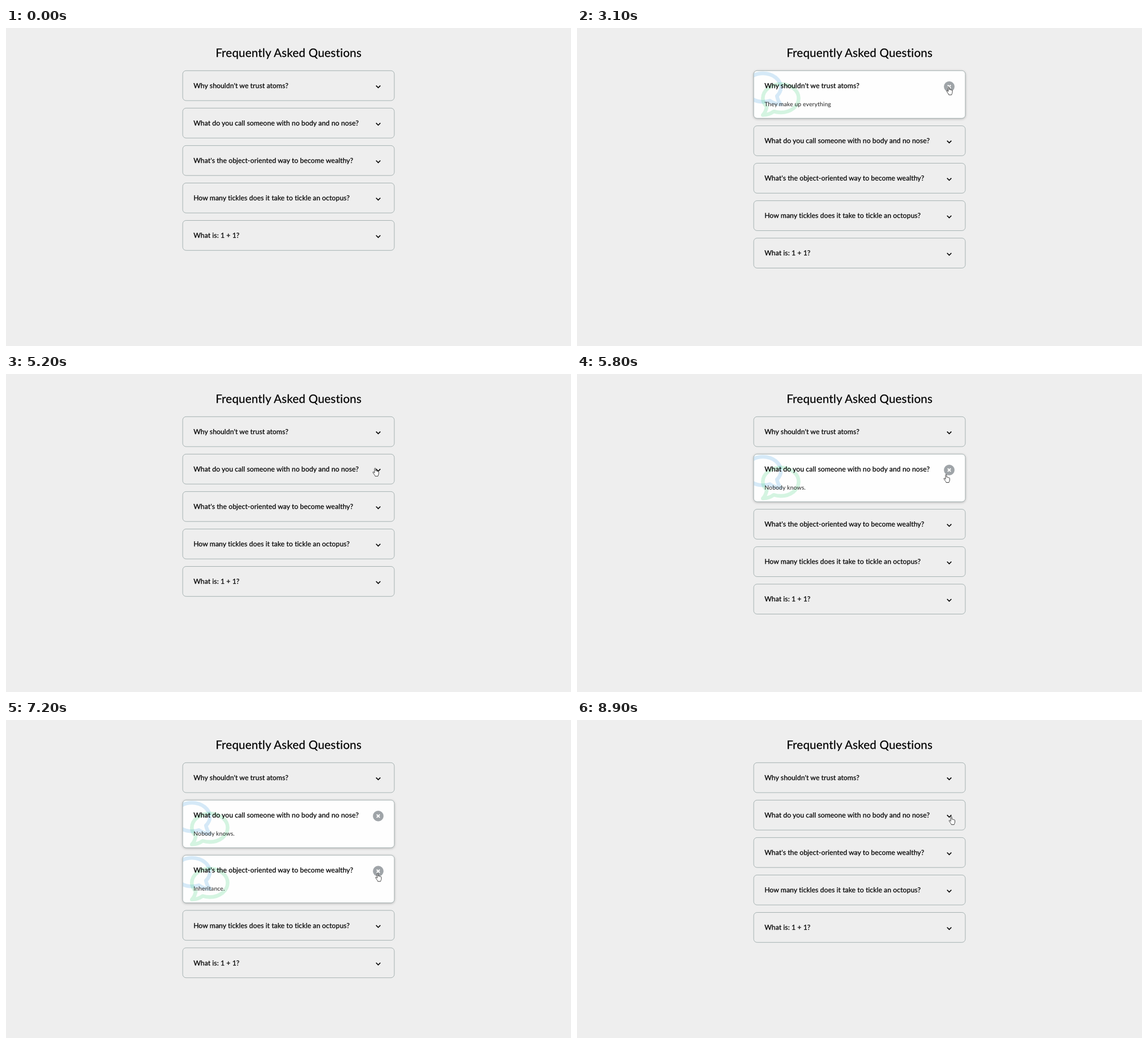
Animation of 998x561 px, one loop 9000 ms. Source, as an HTML page:

```html
<!DOCTYPE html>
<html lang="en">
<head>
<meta charset="utf-8">
<title>Frequently Asked Questions</title>
<style>
  html, body { margin: 0; width: 100%; height: 100%; overflow: hidden; background: #eee; }
  #stage { display: block; width: 998px; height: 561px; }
  text { font-family: Lato, "Open Sans", sans-serif; text-rendering: geometricPrecision; }
  .heading, .question { stroke: #000; stroke-width: .25px; }
  .heading { font-size: 20.5px; letter-spacing: .22px; }
  .question { font-size: 12.2px; letter-spacing: .07px; }
  .answer { font-size: 10.4px; letter-spacing: .14px; fill: #222; }
  .box { stroke: #94a3a3; stroke-width: .8; }
  .bubble { fill: none; stroke-width: 48; stroke-linejoin: round; opacity: .2; }
  .chevron, .cross { fill: none; stroke: #000; stroke-width: 1.6; }
  .cross { stroke: #fff; stroke-width: 2; }
  .cursor { fill: #fff; stroke: #222; stroke-width: .85; stroke-linejoin: round; }
</style>
</head>
<body>
<svg id="stage" viewBox="0 0 998 561">
  <defs>
    <clipPath id="inside"><rect x=".4" y=".6" width="373.2" height="83.4" rx="6"/></clipPath>
    <path id="bubble" d="M75 350C43 318 24 281 24 240C24 138 128 56 256 56S488 138 488 240 384 424 256 424C223 424 193 419 166 410C128 438 80 456 24 456C50 428 66 398 75 350Z"/>
  </defs>
  <text class="heading" x="499.1" y="51.2" text-anchor="middle">Frequently Asked Questions</text>
  <g id="cards"></g>
  <path id="hand" class="cursor" d="M-1 1.1C-1-.4 1-.4 1 1.1V4.9C1.5 4.3 2.7 4.5 2.8 5.4 3.4 4.8 4.5 5.1 4.6 6 5.3 5.5 6.3 5.9 6.3 6.9V9.8C6.3 11.6 5.3 12.3 4.9 14.3H.1C-.2 12.8-1.4 11.7-2.3 10.2L-3.8 7.9C-4.4 6.8-3.1 6.1-2.3 7L-1 8.4Z"/>
  <path id="arrow" class="cursor" d="M.5.5V13.5L3.5 10.8 5.5 15.5 7.5 14.6 5.5 10.2H9.5Z"/>
</svg>
<script>
const LOOP = 9000, STEP = 100, FADE = 300;
const LEFT = 312, TOP = 75, PITCH = 66.05, CLOSED = 52.8, GROWTH = 31.2;
const TOGGLE = { x: 345.5, y: 28.4, r: 9.4 };

const items = [
  { question: "Why shouldn't we trust atoms?", answer: "They make up everything", open: 1950, close: 3850 },
  { question: "What do you call someone with no body and no nose?", answer: "Nobody knows.", open: 5350, close: 8450 },
  { question: "What's the object-oriented way to become wealthy?", answer: "Inheritance.", open: 6750, close: 7450 },
  { question: "How many tickles does it take to tickle an octopus?" },
  { question: "What is: 1 + 1?" }
];

// Pointer path: time, x, y
const path = [
  [300, 219, 155], [500, 300, 100], [700, 420, 69], [1000, 590, 82], [1200, 648, 102], [1600, 656.7, 103.7],
  [4200, 656.7, 103.7], [4800, 654, 146], [5200, 652, 166],
  [5600, 652, 166], [5800, 652, 177.2], [6200, 656.7, 274.5], [6300, 656.7, 274.5], [6500, 656.7, 270.5],
  [7600, 656.7, 270.5], [8000, 661.2, 170.3], [LOOP, 661.2, 170.3]
];

const $ = id => document.getElementById(id);
const clamp = v => Math.min(1, Math.max(0, v));
const ease = v => 1 - (1 - clamp(v)) ** 2;

$("cards").innerHTML = items.map(({ question, answer = "" }) => `
  <g>
    <rect class="box" x=".1" y=".3" width="373.8" rx="6"/>
    <g class="opened">
      <g clip-path="url(#inside)">
        <use href="#bubble" class="bubble" stroke="#3498db" transform="translate(51.4 -2.6) scale(-.1363 .1363)"/>
        <use href="#bubble" class="bubble" stroke="#2ecc71" transform="translate(13 16.3) scale(.1363)"/>
      </g>
      <text class="answer" x="19.2" y="63">${answer}</text>
      <circle cx="${TOGGLE.x}" cy="${TOGGLE.y}" r="${TOGGLE.r}" fill="#9fa4a8"/>
      <path class="cross" d="M342.8 25.7l5.4 5.4m0-5.4l-5.4 5.4"/>
    </g>
    <text class="question" x="19.2" y="31">${question}</text>
    <path class="chevron" d="M341.7 26.6l3.8 3.8 3.8-3.8"/>
  </g>`).join("");

const cards = [...$("cards").children].map(group => ({
  group,
  box: group.querySelector(".box"),
  opened: group.querySelector(".opened"),
  chevron: group.querySelector(".chevron")
}));

const show = (node, on) => node.style.display = on ? "" : "none";

function pointerAt(t) {
  const i = path.findIndex(([time]) => time > t);
  if (i < 1) return null;
  const [t0, x0, y0] = path[i - 1], [t1, x1, y1] = path[i];
  const p = (t - t0) / (t1 - t0);
  return { x: x0 + (x1 - x0) * p, y: y0 + (y1 - y0) * p };
}

function render(t) {
  const pointer = pointerAt(t);
  let shift = 0, overToggle = false;

  cards.forEach(({ group, box, opened, chevron }, i) => {
    const { open = Infinity, close = Infinity } = items[i];
    const isOpen = t >= open && t < close;
    const glow = ease((t - open) / FADE) * (1 - ease((t - close) / FADE));
    const y = TOP + i * PITCH + shift;
    const shadow = `drop-shadow(0 1.9px 1.9px rgba(0,0,0,${.12 * glow}))`;

    group.setAttribute("transform", `translate(${LEFT} ${y})`);
    box.setAttribute("height", CLOSED + (isOpen ? GROWTH : 0));
    box.style.fill = `rgba(254,254,254,${glow})`;
    box.style.filter = glow ? `${shadow} ${shadow}` : "none";
    show(opened, isOpen);
    show(chevron, !isOpen);

    if (pointer) {
      const dx = Math.abs(pointer.x - LEFT - TOGGLE.x), dy = Math.abs(pointer.y - y - TOGGLE.y);
      overToggle ||= Math.max(dx, dy) < TOGGLE.r + .6;
    }
    if (isOpen) shift += GROWTH;
  });

  show($("hand"), pointer && overToggle);
  show($("arrow"), pointer && !overToggle);
  if (pointer) {
    for (const id of ["hand", "arrow"])
      $(id).setAttribute("transform", `translate(${pointer.x} ${pointer.y})`);
  }
}

function tick() {
  const t = performance.now() % LOOP;
  render(Math.floor(t / STEP) * STEP);
  requestAnimationFrame(tick);
}
tick();
</script>
</body>
</html>
```
